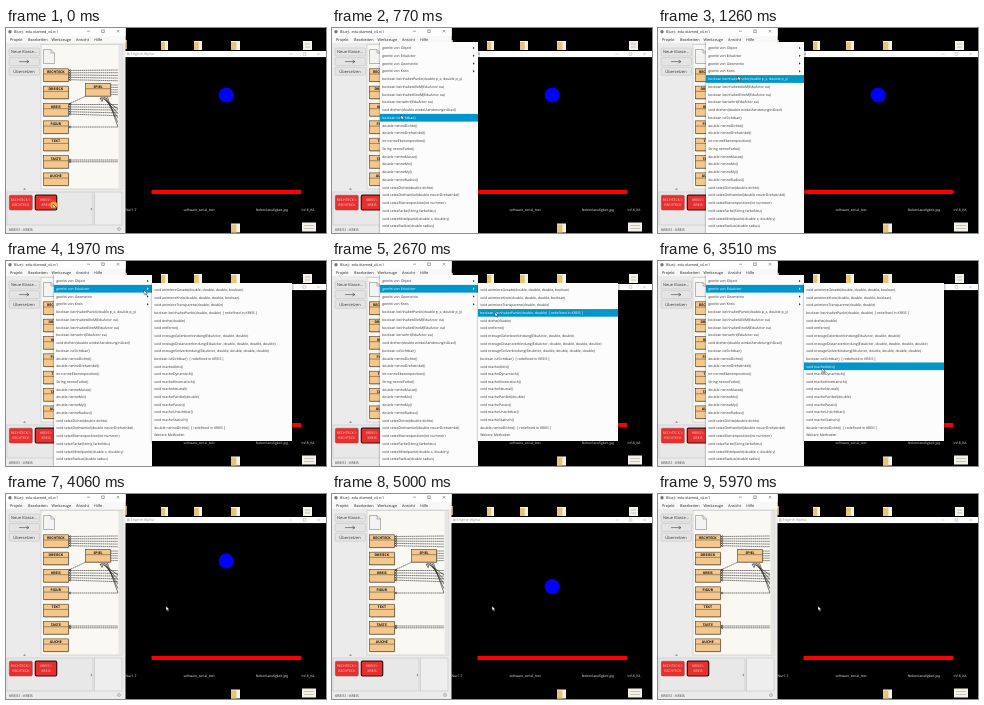
Recreate the animation shown at these times as an HTML page. Size 320x205 px, loop 6040 ms.

```html
<!DOCTYPE html>
<html lang="de">
<head>
<meta charset="utf-8">
<title>Objektmenü</title>
<style>
  html, body { margin: 0; width: 100%; height: 100%; overflow: hidden; background: #000; }
  svg { display: block; width: 320px; height: 205px; }
  text { font-family: "Open Sans", "Noto Sans", sans-serif; text-rendering: geometricPrecision; white-space: pre; }
</style>
</head>
<body>
<svg id="stage" viewBox="0 0 320 205"></svg>
<script>
const NS = "http://www.w3.org/2000/svg";
const stage = document.getElementById("stage");

function add(parent, tag, attrs, content) {
  const el = document.createElementNS(NS, tag);
  for (const key in attrs) el.setAttribute(key, attrs[key]);
  if (content) el.textContent = content;
  return parent.appendChild(el);
}
const group = (parent = stage) => add(parent, "g", {});
const rect = (p, x, y, width, height, fill, more) => add(p, "rect", { x, y, width, height, fill, ...more });
const path = (p, d, more) => add(p, "path", { d, fill: "none", ...more });
const label = (p, x, y, str, size = 3.5, fill = "#222", more) =>
  add(p, "text", { x, y, "font-size": size, fill, ...more }, str);
const centered = { "text-anchor": "middle" };
const show = (el, on) => el.setAttribute("visibility", on ? "visible" : "hidden");

function windowButtons(g, xs, y, stroke) {
  const [a, b, c] = xs;
  path(g, `M${a - 1.5} ${y}h3M${b - 1.3} ${y - 1.3}h2.6v2.6h-2.6zM${c - 1.3} ${y - 1.3}l2.6 2.6m0-2.6l-2.6 2.6`,
    { stroke, "stroke-width": .5 });
}

function drawIcon(g, x, y, w, folder) {
  rect(g, x, y, w, 9, "#f4f1e8");
  if (folder) rect(g, x, y + 1, w * .6, 8, "#e8c572");
  else path(g, `M${x + 2} ${y + 3}h${w - 4}m0 3h${4 - w}`, { stroke: "#aaa69a", "stroke-width": .6 });
}

function drawDesktop(g) {
  rect(g, 0, 0, 320, 205, "#000");
  rect(g, 119, 12, 2, 9, "#b79a6a");
  for (const [x, w] of [[155, 7], [188, 8], [225, 9]]) drawIcon(g, x, 13, w, true);
  drawIcon(g, 297, 13, 9);
  drawIcon(g, 225, 195.5, 9, true);
  drawIcon(g, 296, 194.5, 14);
  [["Nur1-7", 125], ["software_serial_test", 193], ["Nebenlaeufigkeit.jpg", 266], ["Inf-8_KA", 302]]
    .forEach(([s, x]) => label(g, x, 183, s, 3.4, "#eee", centered));
}

function drawGame(g) {
  rect(g, 119, 23, 201, 6.3, "#fff");
  rect(g, 121, 24.5, 2.6, 2.8, "#c9c9c9");
  label(g, 124.5, 27.4, "Engine Alpha", 3.9, "#999");
  windowButtons(g, [285, 298.5, 312.5], 26, "#aaa");
  rect(g, 119, 29.3, 201, 149.7, "#000");
}

function drawClass(g, x, y, name) {
  rect(g, x + .8, y + .8, 25, 12.6, "#b9b4ab");
  rect(g, x, y, 25, 12.6, "#f4c88c", { stroke: "#4d3b22", "stroke-width": .6 });
  path(g, `M${x} ${y + 5.2}h25`, { stroke: "#4d3b22", "stroke-width": .5 });
  label(g, x + 12.5, y + 4.1, name, 3.5, "#111", { ...centered, "font-weight": 700 });
}

function drawUses(g) {
  const solid = { stroke: "#222", "stroke-width": .6 };
  const dashed = { ...solid, "stroke-dasharray": "1.6 .5" };
  const use = (y, x2 = 112, y2 = y) => {
    path(g, `M63 ${y}L${x2} ${y2}`, dashed);
    path(g, `M65 ${y - 1}L63 ${y}l2 1`, solid);
  };
  for (let i = 0; i < 5; i++) {
    use(42.5 + i * 2.3, 112, 42 + i * 2.7);
    use(76.5 + i * 2.4, 112, 76.5 + i * 2.8);
    path(g, `M${95 + i * 1.6} 69L112 ${81 + i * 4.5}`, solid);
    path(g, `M105 ${57 + i * 2.4}h7`, dashed);
  }
  use(76, 80, 68);
  use(99);
  use(132);
  use(133.8);
  path(g, "M94 70l3 1.5l-1 2z", { ...solid, fill: "#fff" });
}

function drawObject(g, x, w, name, type, border) {
  rect(g, x, 167.2, w, 14.8, "#e5302f", { rx: 1.2, ...border });
  [name + ":", type].forEach((s, i) =>
    label(g, x + w / 2, 173.4 + i * 5, s, 3.5, "#ffd0cb", centered));
}

function drawEditor(g) {
  rect(g, 0, 0, 119.5, 205, "#ebebeb");
  rect(g, 0, 0, 119.5, 15, "#f8f8f8");
  rect(g, 0, 0, 119.5, 8, "#fff");
  add(g, "circle", { cx: 4, cy: 3.8, r: 1.7, fill: "#777" });
  label(g, 8, 5.2, "BlueJ:  edu-diamed_v4.rc1", 3.7);
  windowButtons(g, [82.5, 97, 112], 3.2, "#555");
  [["Projekt", 4], ["Bearbeiten", 22], ["Werkzeuge", 45.5], ["Ansicht", 70], ["Hilfe", 88]]
    .forEach(([s, x]) => label(g, x, 13.3, s, 3.8));

  ["Neue Klasse...", "", "Übersetzen"].forEach((s, i) => {
    const y = 20 + i * 9.6;
    rect(g, 3, y, 30.5, 8, "#e4e4e4", { rx: 1, stroke: "#bdbdbd", "stroke-width": .5 });
    label(g, 18, y + 5.4, s, 4, "#333", centered);
  });
  path(g, "M13 33.6h10m-2.5-1.5l2.5 1.5l-2.5 1.5", { stroke: "#444", "stroke-width": .6 });

  rect(g, 35, 16.5, 81, 144.5, "#faf8f2", { stroke: "#c4c4c4", "stroke-width": .6 });
  path(g, "M37.5 21.5h7.5l3.5 3.5v10.5h-11zM45 21.5v3.5h3.5", { stroke: "#888", "stroke-width": .6, fill: "#f3f3f3" });
  drawUses(g);
  ["RECHTECK", "DREIECK", "KREIS", "FIGUR", "TEXT", "TASTE", "AUCHE"]
    .forEach((s, i) => drawClass(g, 37.3, 40.8 + i * 17.35, s));
  drawClass(g, 79.5, 55.5, "SPIEL");
  rect(g, 112.5, 17, 3.5, 143.5, "#e6e6e6");

  path(g, "M17 161.7l1.5-1.6l1.5 1.6z", { fill: "#888" });
  const pane = { stroke: "#c2c2c2", "stroke-width": .6 };
  rect(g, 1, 164, 86, 33, "#e8e8e8", pane);
  rect(g, 88.5, 164, 27.5, 33, "#eeeeee", pane);
  path(g, "M86 179.5l-1.5 1.5l1.5 1.5z", { fill: "#888" });
  drawObject(g, 3.3, 23, "RECHTECK1", "RECHTECK", { stroke: "#a8393a", "stroke-width": .5 });
  drawObject(g, 29.3, 21.4, "KREIS1", "KREIS", { stroke: "#3a0c0c", "stroke-width": 1.2 });
  label(g, 3, 202.8, "KREIS1 : KREIS", 3.6, "#333");
  add(g, "circle", { cx: 113, cy: 201, r: 1.4, fill: "none", stroke: "#777", "stroke-width": .5 });
}

// A popup list; pick(row) moves the highlight, -1 clears it.
function makeMenu(x, y, w, h, first, pitch, items, arrows = 0) {
  const g = group();
  rect(g, x - 1.2, y, w + 3, h + 2.5, "#000", { opacity: .16 });
  rect(g, x, y, w, h, "#fcfcfc");
  const bar = rect(g, x, 0, w, pitch, "#0096c9");
  const rows = items.map((s, i) => {
    const cy = first + i * pitch, row = group(g);
    label(row, x + 2.2, cy + 1.2, s, 3.5, "inherit");
    if (i < arrows) path(row, `M${x + w - 5} ${cy - 1.2}l1.6 1.2l-1.6 1.2z`, { fill: "inherit" });
    return row;
  });
  return {
    g,
    rowAt: py => Math.floor((py - first) / pitch + .5),
    pick(n) {
      bar.setAttribute("y", first + (n - .5) * pitch);
      bar.setAttribute("opacity", n < 0 ? 0 : 1);
      rows.forEach((r, i) => r.setAttribute("fill", i === n ? "#fff" : "#333"));
    }
  };
}

drawDesktop(group());
drawGame(group());
add(add(stage, "clipPath", { id: "view" }), "rect", { x: 119, y: 29.3, width: 201, height: 149.7 });
const ball = add(add(stage, "g", { "clip-path": "url(#view)" }), "circle", { cx: 220.2, r: 7.6, fill: "#00f" });
rect(stage, 145.5, 162, 149.5, 4, "#f00");
drawEditor(group());

const EDU = 1;
const menu = makeMenu(48, 14, 98, 195, 20, 7.75, [
  "geerbt von Object", "geerbt von EduActor", "geerbt von Geometrie", "geerbt von Kreis",
  "boolean beinhaltetPunkt(double p_x, double p_y)",
  "boolean beinhaltetAlleM(EduActor ea)",
  "boolean beinhaltetEineM(EduActor ea)",
  "boolean beruehrt(EduActor ea)",
  "void drehen(double winkelAenderungInGrad)",
  "boolean istSichtbar()",
  ...["Dichte", "Drehwinkel"].map(s => `double nenne${s}()`),
  "int nenneEbenenposition()", "String nenneFarbe()",
  ...["Masse", "Mx", "My", "Radius"].map(s => `double nenne${s}()`),
  "void setzeDichte(double dichte)",
  "void setzeDrehwinkel(double neuerDrehwinkel)",
  "void setzeEbenenposition(int nummer)",
  "void setzeFarbe(String farbeNeu)",
  "void setzeMittelpunkt(double x, double y)",
  "void setzeRadius(double radius)"
], 4);

const redefined = "  [ redefined in KREIS ]";
const submenu = makeMenu(146, 22, 140, 158, 29, 7.63, [
  "void animiereGerade(double, double, double, boolean)",
  "void animiereKreis(double, double, double, boolean)",
  "void animiereTransparenz(double, double)",
  "boolean beinhaltetPunkt(double, double)" + redefined,
  "void drehe(double)", "void entferne()",
  "void erzeugeGelenkverbindung(EduActor, double, double)",
  "void erzeugeDistanzverbindung(EduActor, double, double, double, double)",
  "void erzeugeSeilverbindung(EduActor, double, double, double, double)",
  "boolean istSichtbar()" + redefined,
  ...["Aktiv()", "Dynamisch()", "Kinematisch()", "Neutral()", "Partikel(double)",
    "Passiv()", "Unsichtbar()", "Statisch()"].map(s => "void mache" + s),
  "double nenneDichte()" + redefined,
  "Weitere Methoden"
]);

const pointer = group();
const glow = add(pointer, "circle", { cx: .7, cy: 1, r: 3.5, fill: "#ffb52e", opacity: .9 });
path(pointer, "M0 0v4.6l1.1-1l.8 1.8l.8-.4l-.8-1.6h1.5z", { fill: "#fff", stroke: "#111", "stroke-width": .4 });

const LOOP = 6040, OPEN = 202, SUB = 1510, CLOSE = 3830, DROP = 4068, GRAVITY = 3.59e-5;

const ticks = [
  [0, 0, 1], [60, 770, 6], [940, 1000, 2], [1170, 1970, 8], [2110, 2210, 2], [2340, 2670, 4],
  [2820, 3360, 6], [3510, 3600, 2], [3715, 4060, 4], [4210, 4540, 4], [4680, 5720, 10], [5890, 5970, 2]
].flatMap(([a, b, n]) => Array.from({ length: n }, (_, i) => n > 1 ? a + (b - a) * i / (n - 1) : a));

// Mouse route: [time, x, y]
const route = [
  [60, 47, 176], [344, 55, 150], [770, 69, 87], [1000, 74, 62], [1400, 88, 29], [1970, 138, 29],
  [2210, 152, 35], [2670, 163, 51], [3360, 164, 95], [3510, 164, 107], [3830, 163, 108], [4060, 160, 112]
];

function mouseAt(t) {
  const i = route.findIndex(k => k[0] > t);
  if (i === 0) return route[0].slice(1);
  if (i < 0) return route[route.length - 1].slice(1);
  const a = route[i - 1], b = route[i], f = (t - a[0]) / (b[0] - a[0]);
  return [1, 2].map(k => a[k] + (b[k] - a[k]) * f);
}

function render(ms) {
  const t = ticks.filter(v => v <= ms + .5).pop();
  const [x, y] = mouseAt(t);
  const open = t >= OPEN - .5 && t < CLOSE, sub = open && t >= SUB;
  show(menu.g, open);
  show(submenu.g, sub);
  menu.pick(sub ? EDU : menu.rowAt(y));
  submenu.pick(x > 146 ? submenu.rowAt(y) : -1);
  show(glow, t < OPEN - .5);
  pointer.setAttribute("transform", `translate(${x} ${y})`);
  ball.setAttribute("cy", 67 + GRAVITY * Math.max(0, t - DROP) ** 2);
}

const start = performance.now();
function frame() {
  render((performance.now() - start) % LOOP);
  requestAnimationFrame(frame);
}
frame();
</script>
</body>
</html>
```
